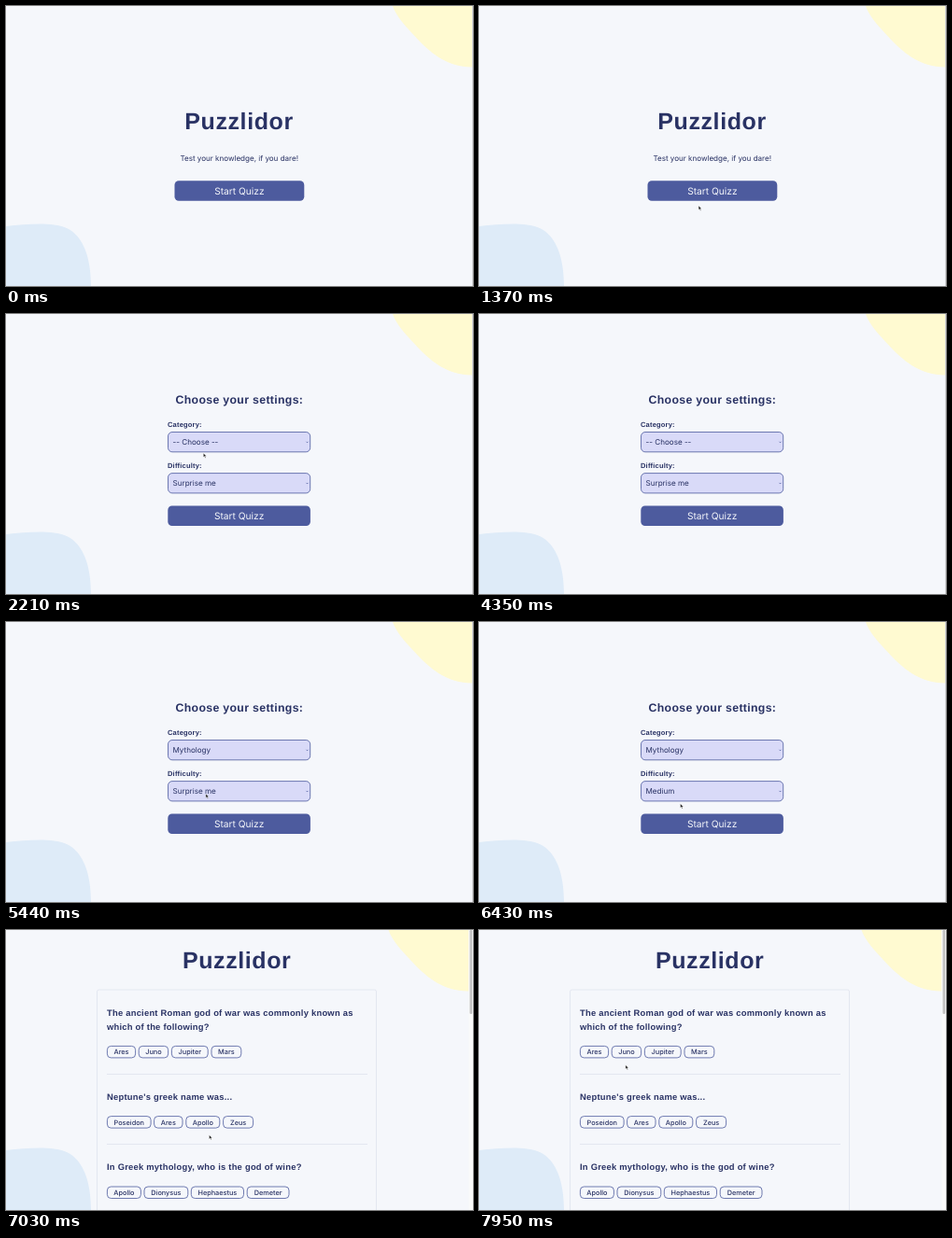
Write an HTML page that moves like this. It is 500 px wide and 300 px high and loops after 7990 ms.

```html
<!DOCTYPE html>
<html lang="en">
<head>
<meta charset="utf-8">
<title>Quiz</title>
<style>
  html, body { margin: 0; width: 100%; height: 100%; overflow: hidden; background: #f5f7fb; }
  svg { display: block; width: 100%; height: 100%; }
  text { fill: #293264; font-family: Inter, sans-serif; text-rendering: geometricPrecision; }
  .head { font-family: "Liberation Sans", Arial, sans-serif; font-weight: 700; }
  .title { font-size: 25px; letter-spacing: .6px; }
  .subtitle { font-size: 12.3px; letter-spacing: .33px; }
  .question { font-size: 9.4px; letter-spacing: .24px; }
  .label { font-size: 7.5px; letter-spacing: .2px; }
  .intro { font-size: 8.05px; }
  .value { font-size: 8.1px; }
  .action { font-size: 10.2px; fill: #f5f7fb; }
  .pill { font-size: 7.3px; font-weight: 500; }
  .mid { text-anchor: middle; }
  .field { fill: #d9daf8; stroke: #4d5b9e; stroke-width: .8; }
  .outline { fill: none; stroke: #4d5b9e; stroke-width: .8; }
  .rule { fill: none; stroke: #dfe2ee; stroke-width: .8; }
</style>
</head>
<body>
<svg id="stage" viewBox="0 0 500 300" preserveAspectRatio="none"></svg>
<script>
const LOOP = 7990;
const SETTINGS_AT = 1930, CATEGORY_AT = 4640, LEVEL_AT = 6350, QUIZ_AT = 6950;

const text = (x, y, cls, content, id = '') =>
  `<text x="${x}" y="${y}" class="${cls}" id="${id}">${content}</text>`;
const rect = (x, y, w, h, r, cls, id = '') =>
  `<rect x="${x}" y="${y}" width="${w}" height="${h}" rx="${r}" class="${cls}" id="${id}"/>`;

const button = (id, x, y, w) => `<g id="${id}">${rect(x, y, w, 21.5, 4.5, '')}
  ${text(x + w / 2, y + 14.4, 'action mid', 'Start Quizz')}</g>`;

const select = (id, y, label) => text(173, y - 5.6, 'head label', label) +
  rect(173.5, y, 152.2, 21.3, 4.5, 'field', id + 'Box') +
  text(178.5, y + 13.6, 'value', '', id) +
  `<path d="M321.5 ${y + 10.3}l1 1 1-1" class="outline"/>`;

// Each answer is a label followed by the left edge and width of its pill.
const question = (y, lines, answerY, answers) =>
  lines.map((line, i) => text(108, y + i * 15, 'head question', line)).join('') +
  answers.map(([label, x, w]) => rect(x, answerY, w, 12.5, 4, 'outline') +
    text(x + w / 2, answerY + 8.9, 'pill mid', label)).join('');

document.getElementById('stage').innerHTML = `
  <rect width="500" height="300" fill="#f5f7fb"/>
  <path id="yellow" d="M414 0C418 12 430 24 444 39C456 51 474 66 500 65.5V0Z" fill="#fffad1"/>
  <path d="M0 236C22 234 48 231 65 238C84 247 91 272 91 300H0Z" fill="#deebf8"/>
  <rect id="edge" x="499" width="1" height="300" fill="#d0d1d4"/>

  <g id="start">
    ${text(249.5, 132, 'head title mid', 'Puzzlidor')}
    ${text(249.7, 165.6, 'intro mid', 'Test your knowledge, if you dare!')}
    ${button('startButton', 180.5, 187.3, 138.8)}
  </g>

  <g id="settings">
    ${text(249.9, 95.7, 'head subtitle mid', 'Choose your settings:')}
    ${select('category', 126.5, 'Category:')}
    ${select('level', 170.6, 'Difficulty:')}
    ${button('playButton', 173.3, 205.5, 152.6)}
  </g>

  <g id="quiz">
    ${text(247.2, 41, 'head title mid', 'Puzzlidor')}
    ${rect(97.5, 64, 299, 260, 2, 'rule')}
    <path d="M108 154.5H387M108 229.5H387" class="rule"/>
    ${question(91.7, ['The ancient Roman god of war was commonly known as', 'which of the following?'], 124.4,
      [['Ares', 108.4, 30.2], ['Juno', 142.2, 31.4], ['Jupiter', 177.4, 38.8], ['Mars', 220, 31.8]])}
    ${question(182, ["Neptune's greek name was..."], 199.6,
      [['Poseidon', 108.4, 46.7], ['Ares', 158.6, 30.4], ['Apollo', 192.8, 36], ['Zeus', 232.6, 32]])}
    ${question(257.2, ['In Greek mythology, who is the god of wine?'], 275,
      [['Apollo', 108.4, 36], ['Dionysus', 148, 46.8], ['Hephaestus', 198.3, 56.2], ['Demeter', 258.2, 44.8]])}
    <rect x="495.5" width="4.5" height="300" fill="#fafafa"/>
    <rect x="496.5" y="0" width="2.7" height="90" rx="1.3" fill="#c1c1c1"/>
  </g>

  <g id="cursor" stroke-linejoin="round">
    <path id="arrow" d="M.4 .2V4.4L1.5 3.5L2.3 5.3L3 5L2.2 3.3H3.6Z" fill="#111" stroke="#fff" stroke-width=".4"/>
    <path id="hand" d="M.2 1Q1 .2 1.7 1.2L2.6 2.6L4.4 3L5 5L4.2 6.4H2.4L0 4.2L.6 3.6L1.4 4Z"
      fill="#fff" stroke="#111" stroke-width=".6"/>
  </g>`;

const el = id => document.getElementById(id);
const show = (id, visible) => el(id).style.display = visible ? '' : 'none';
const ramp = (t, start, duration) => Math.min(1, Math.max(0, (t - start) / duration));

// Pointer stops: time, x, y.
const path = [
  [1250, 240, 229], [1410, 233, 209], [1650, 225.5, 197], [1850, 220, 195], [2050, 220, 195],
  [2210, 211, 149], [2330, 207, 140], [2450, 207, 140], [2650, 210, 133], [2810, 213, 139],
  [4350, 213, 139], [4640, 218, 219], [4800, 215, 192], [4920, 215, 192], [5160, 212, 181],
  [5440, 213.5, 184], [6310, 213.5, 184], [6560, 217, 206], [6750, 217.5, 221], [6830, 217.5, 221],
  [7110, 217, 219], [7550, 161, 140], [7750, 157.5, 144.5], [7910, 157.5, 144.5], [7950, 156.5, 144.5]
];

function pointerAt(t) {
  const next = path.findIndex(stop => stop[0] > t);
  if (next <= 0) return (next ? path[path.length - 1] : path[0]).slice(1);
  const [t0, x0, y0] = path[next - 1], [t1, x1, y1] = path[next];
  const k = (t - t0) / (t1 - t0);
  return [x0 + (x1 - x0) * k, y0 + (y1 - y0) * k];
}

function setHover(id, cx, cy, amount) {
  const scale = 1 + .03 * amount;
  el(id).setAttribute('transform', `translate(${cx} ${cy}) scale(${scale}) translate(${-cx} ${-cy})`);
  const mix = (from, to) => Math.round(from + (to - from) * amount);
  el(id).firstElementChild.setAttribute('fill', `rgb(${mix(77, 41)},${mix(91, 50)},${mix(158, 100)})`);
}

function draw(t) {
  const quiz = t >= QUIZ_AT;
  show('start', t < SETTINGS_AT);
  show('settings', t >= SETTINGS_AT && !quiz);
  show('quiz', quiz);
  show('edge', !quiz);
  el('yellow').setAttribute('transform', `translate(${quiz ? -4.5 : 0})`);

  el('category').textContent = t < CATEGORY_AT ? '-- Choose --' : 'Mythology';
  el('level').textContent = t < LEVEL_AT ? 'Surprise me' : 'Medium';
  el('categoryBox').style.stroke = t >= CATEGORY_AT && t < 5400 ? '#3c4985' : '';

  setHover('startButton', 249.9, 198, ramp(t, 1410, 200));
  setHover('playButton', 249.6, 216.2,
    ramp(t, 4640, 200) - ramp(t, 4700, 200) + ramp(t, 6560, 180));

  const overButton = (t >= 1410 && t < SETTINGS_AT) || (t >= 4640 && t < 4700) || (t >= 6560 && !quiz);
  show('cursor', t >= 1250 && (t < 4350 || t >= 4640));
  show('arrow', !overButton);
  show('hand', overButton);
  el('cursor').setAttribute('transform', `translate(${pointerAt(t)})`);
}

function frame() {
  draw(performance.now() % LOOP);
  requestAnimationFrame(frame);
}
frame();
</script>
</body>
</html>
```
